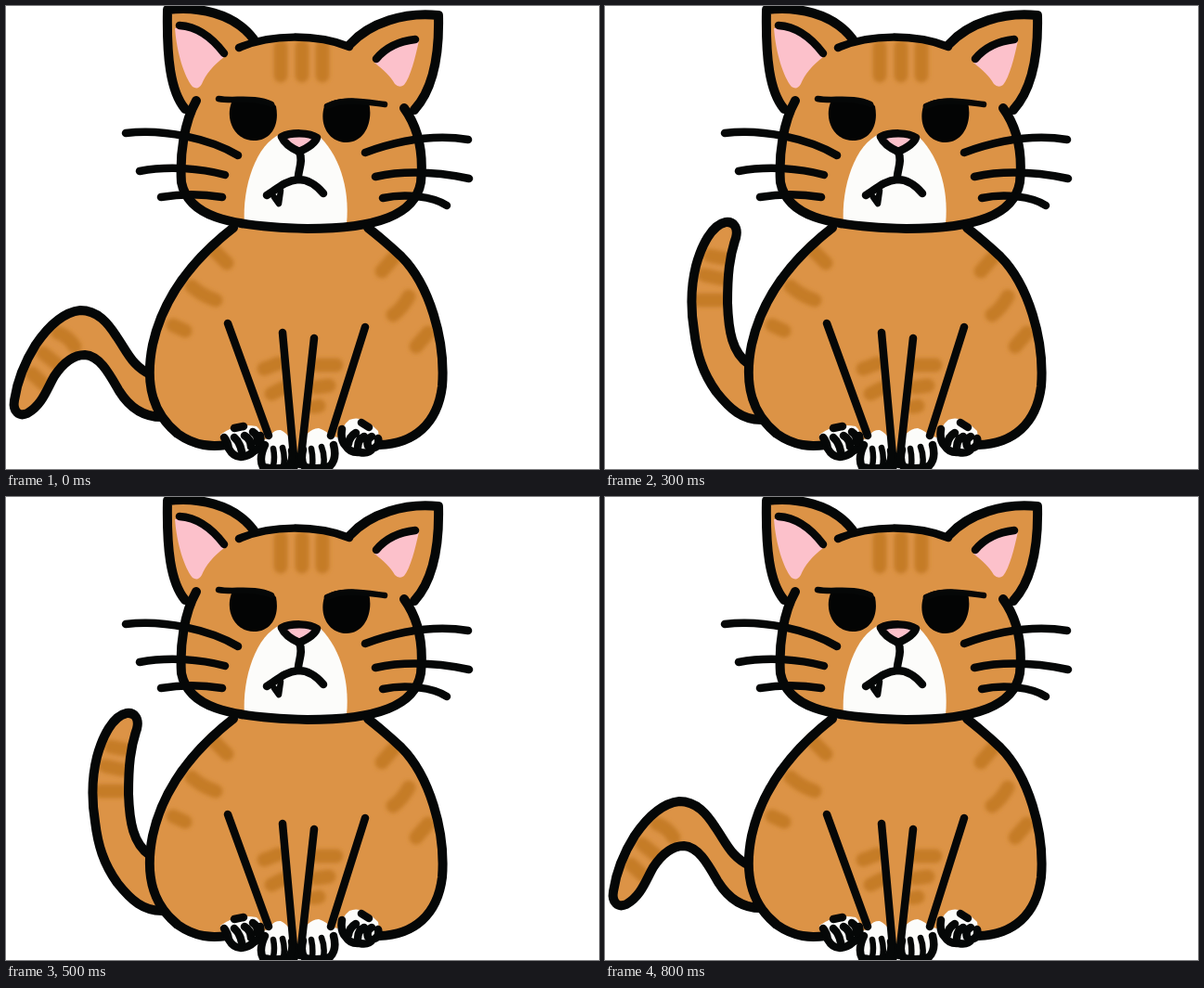
An HTML page that plays this animation: 639 px wide and 499 px high, repeating every 900 ms.

```html
<!DOCTYPE html>
<html lang="en">
<head>
<meta charset="utf-8">
<title>Grumpy cat wagging its tail</title>
<style>
  html, body { margin: 0; width: 100%; height: 100%; overflow: hidden; background: #fff; }
  svg { display: block; width: 639px; height: 499px; }
  path { fill: none; stroke-linecap: round; stroke-linejoin: round; }
  .line { stroke: #050707; stroke-width: 8.5; }
  .bold { stroke-width: 10; }
  .thin { stroke-width: 6.5; }
  .fur { fill: #dc9346; }
  .pink { fill: #fcc1cb; }
  .white { fill: #fcfcfa; }
  .black { fill: #030404; }
  .stripe { stroke: #c57c28; stroke-width: 15; filter: url(#soft); }
</style>
</head>
<body>
<svg viewBox="0 0 639 499">
  <defs>
    <filter id="soft" filterUnits="userSpaceOnUse" x="0" y="0" width="639" height="499">
      <feGaussianBlur stdDeviation="2"/>
    </filter>
  </defs>

  <g id="tail">
    <path class="fur" id="tailFur"/>
    <path class="stripe" id="tailStripes"/>
    <path class="line bold" id="tailLine"/>
  </g>

  <g id="body">
    <path class="fur" d="M245 239C205 270 171 310 159 365C150 410 160 440 185 460C205 474 222 474 238 472L262 470 284 466 290 485H340L352 464 402 472C440 472 465 450 469 410C474 360 455 300 425 270Q409 254 390 239Z"/>
    <path class="stripe" d="M224 263L238 277M200 302Q211 312 226 317M180 344L193 350M417 272L405 286M434 313Q427 326 417 333M455 352L442 367"/>
    <path class="stripe" d="M278 391L294 385M286 418L298 412M336 387H356M334 411L348 409M332 432L337 431"/>
    <path class="line bold" d="M245 239C205 270 170 310 158 365C149 410 159 440 185 461C205 475 222 475 238 473M402 473C440 472 465 450 470 410C474 360 456 300 426 270Q409 254 390 239"/>
    <path class="white" d="M231 462Q248 449 270 453Q278 460 274 474Q262 488 248 485Q235 476 231 462ZM401 458Q384 440 370 446Q359 455 360 468Q372 483 388 482Q404 473 401 458ZM277 478Q284 456 296 457Q310 464 309 482Q306 499 290 499Q275 496 277 478ZM319 476Q322 456 337 455Q355 461 355 480Q350 499 334 499Q320 496 319 476Z"/>
    <path class="line" d="M239 342L283 463M298 352L311 496M332 358L317 494M387 346L350 463"/>
    <path class="line" d="M246 455L256 453M383 449L391 454M235 465Q239 470 240 477Q245 486 253 486Q262 485 267 480Q276 475 274 463M362 456Q360 468 366 474Q371 482 381 481Q391 483 395 477Q403 475 401 466"/>
    <path class="line" d="M246 465Q252 470 254 480M257 463Q264 467 264 475M266 459Q272 463 271 470M369 472Q370 464 377 460M379 476Q379 467 386 464M390 474Q388 467 394 464"/>
    <path class="line" d="M279 473Q272 488 277 497Q290 500 304 497Q310 489 308 479M320 478Q317 491 322 497Q337 500 349 496Q357 488 353 473"/>
    <path class="line thin" d="M288 477Q290 486 288 496M298 476Q301 486 299 496M329 477Q331 486 330 496M340 475Q344 485 342 496"/>
  </g>

  <g id="head">
    <path class="fur" d="M193 111C177 92 173 55 174 4C205 0 246 7 267 36C300 32 340 32 370 42C392 18 430 6 466 10C467 50 462 88 440 112L430 110C445 132 450 160 447 190C441 225 400 240 325 240C235 238 196 225 189 190C187 160 192 125 202 108Z"/>
    <path class="stripe" d="M296 44V75M319 44V75M341 44V75"/>
    <path class="pink" d="M182 24C184 50 192 76 201 87Q207 91 211 84C215 74 223 64 235 55C222 33 205 21 182 24ZM445 37C441 56 436 76 429 85Q424 89 419 84C414 75 407 69 397 61C408 44 422 36 445 37Z"/>
    <path class="white" d="M257 235C254 195 270 148 296 138H335C358 158 371 195 367 235Z"/>
    <path class="line bold" d="M193 111C177 92 173 55 174 4C205 0 246 7 267 36M440 112C462 88 467 50 466 10C430 6 392 18 371 41"/>
    <path class="line" d="M187 21C205 22 222 34 235 51M441 36C422 38 408 46 399 57M251 45C285 30 335 30 370 44"/>
    <path class="line bold" d="M205 102C192 125 187 160 189 190C196 225 235 238 325 240C400 240 441 225 447 190C450 160 445 132 429 110"/>
    <path class="black" d="M243 104C236 122 246 145 267 145C286 145 295 128 291 108C284 98 258 97 243 104ZM343 108C337 128 348 147 367 147C387 147 396 124 391 104C376 97 352 98 343 108Z"/>
    <path class="line thin" d="M229 100C245 103 268 97 286 106M408 106C385 103 365 99 346 108"/>
    <path class="line pink" d="M297 141C307 136 327 136 335 142C333 148 323 154 316 157C307 153 300 148 297 141Z"/>
    <path class="line" d="M316 157C321 168 314 178 315 187M281 204C290 199 300 188 315 187C328 187 337 196 342 202"/>
    <path class="line thin white" d="M289 206L294 213 296 199"/>
    <path class="line" d="M129 137C170 132 220 143 250 161M144 178C175 172 210 175 236 182M167 206C190 202 215 203 233 206M387 158C420 146 460 138 498 144M398 184C430 177 465 179 499 186M406 207C430 202 460 205 475 215"/>
  </g>
</svg>
<script>
  // Tail poses from lowest to highest: outline and fur stripes.
  const poses = [
    ["M157 398C136 388 132 375 119 356C110 342 99 328 80 328C62 330 45 346 32 365C20 384 12 405 9 425C7 437 14 443 23 439C39 430 44 413 52 399C62 384 72 376 85 376C101 377 111 396 122 415C132 431 146 443 168 443",
     "M56 352Q67 356 74 367M40 374L55 386M28 396L40 407"],
    ["M157 396C142 384 138 362 127 343C118 322 98 305 80 303C56 301 32 314 14 334C3 348 2 361 8 367C18 374 30 366 40 359C56 347 74 342 86 347C103 356 107 385 118 409C129 430 146 443 168 443",
     "M29 334L38 350M50 319L58 337M78 313V334"],
    ["M156 394C147 375 140 352 134 325C130 298 110 284 88 276C70 271 50 268 38 269C24 271 18 281 18 289C21 302 34 304 48 305C70 308 90 318 99 332C110 350 109 380 117 405C125 425 145 441 168 444",
     "M51 280L50 296M73 283L74 302M100 295L94 315"],
    ["M155 386C137 374 133 350 132 320C132 290 134 270 141 250C144 238 138 232 130 233C115 236 104 258 98 280C93 300 92 325 96 350C99 375 105 395 120 416C135 435 148 446 168 446",
     "M113 269L128 272M107 290L126 294M102 317H125"],
    ["M156 386C145 374 146 346 150 318C154 290 163 270 171 251C175 239 169 231 160 233C144 238 127 262 117 284C107 306 101 328 102 352C103 376 108 396 122 416C136 435 148 446 168 446",
     "M139 268L154 274M127 290L147 296M118 317L142 320"]
  ];
  const order = [0, 1, 2, 3, 4, 3, 2, 1, 0];
  const stepMs = 100;
  const setPath = (id, d) => document.getElementById(id).setAttribute("d", d);

  function draw() {
    const step = Math.floor(performance.now() / stepMs) % order.length;
    const [outline, stripes] = poses[order[step]];
    setPath("tailFur", outline);
    setPath("tailLine", outline);
    setPath("tailStripes", stripes);
    requestAnimationFrame(draw);
  }
  draw();
</script>
</body>
</html>
```
